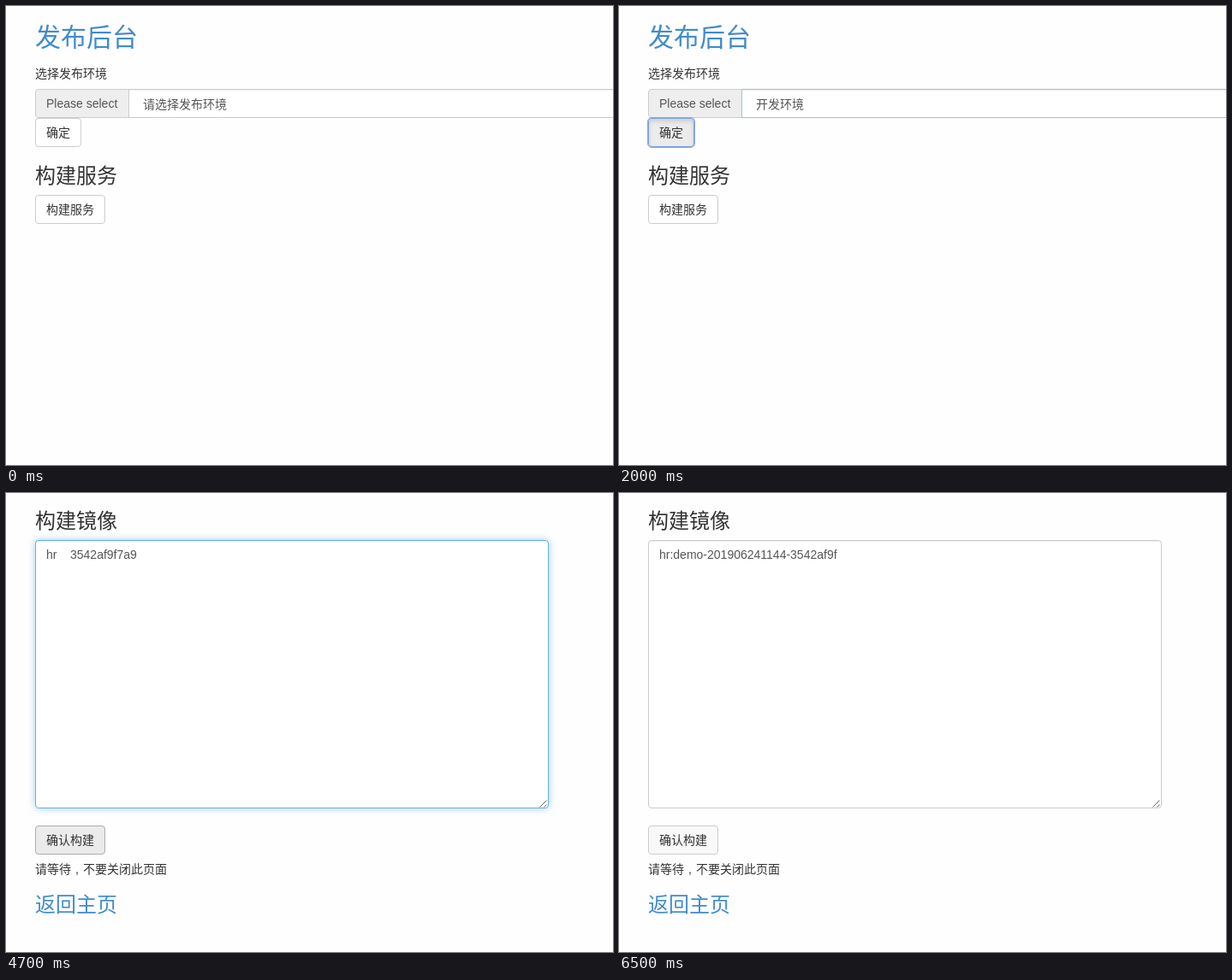
Recreate the animation shown at these times as an HTML page. Size 709 by 537 pixels, loop 8000 ms.

```html
<!DOCTYPE html>
<html lang="zh-CN">
<head>
<meta charset="utf-8">
<style>
html, body { margin: 0; width: 100%; height: 100%; overflow: hidden; background: #fefefe; }
#stage { position: absolute; left: 0; top: 0; width: 709px; height: 537px; overflow: hidden;
  font-family: "Liberation Sans", "Noto Sans CJK SC", "Noto Sans CJK", sans-serif; color: #333; }
#stage div { position: absolute; box-sizing: border-box; }
#stage .text { line-height: 20px; white-space: pre; }
.page { left: 0; top: 0; width: 100%; height: 100%; }
.box { border: 1px solid #ccc; border-radius: 4px; background: #fff; }
.press { background: #ebebeb; box-shadow: inset 0 3px 5px rgba(0,0,0,.125); }
.hover { background: #ebebeb; border-color: #adadad; }
.focus { outline: 1px solid #86a8ea; border-color: #7d9fe2; }
svg { position: absolute; left: 0; top: 0; }
</style>
</head>
<body>
<div id="stage"></div>
<script>
const LOOP = 8000;
const LINK = '#428bca';
const stage = document.getElementById('stage');

function add(parent, cls, style) {
  const el = document.createElement('div');
  el.className = cls;
  Object.assign(el.style, style);
  parent.appendChild(el);
  return el;
}

function box(parent, x, y, w, h, style, cls = 'box') {
  return add(parent, cls, { left: x + 'px', top: y + 'px', width: w + 'px', height: h + 'px', ...style });
}

// y is the text baseline
function text(parent, x, y, str, size = 14, color = '') {
  const top = y - Math.round(10 + size * 0.3465);
  const el = add(parent, 'text', { left: x + 'px', top: top + 'px', fontSize: size + 'px', color });
  el.textContent = str;
  return el;
}

function button(parent, y, w, label) {
  const el = box(parent, 34, y, w, 34);
  text(parent, 47, y + 22, label);
  return el;
}

const show = (el, on) => { el.style.visibility = on ? 'inherit' : 'hidden'; };
const mix = (a, b, k) => Math.round(a + (b - a) * k);

function glow(el, k) {
  el.style.borderColor = `rgb(${mix(204, 102, k)},${mix(204, 175, k)},${mix(204, 233, k)})`;
  el.style.boxShadow = `inset 0 1px 1px rgba(0,0,0,.075), 0 0 ${8 * k}px rgba(102,175,233,${0.6 * k})`;
}

// Home page
const home = add(stage, 'page');
text(home, 34, 47, '发布后台', 30, LINK);
text(home, 34, 84, '选择发布环境');
box(home, 34, 97, 110, 34, { background: '#eee', borderRadius: '4px 0 0 4px' });
text(home, 47, 119, 'Please select', 14, '#555');
const select = box(home, 143, 97, 640, 34, { borderRadius: 0 });
const chosen = text(home, 160, 120, '', 14, '#555');
const okButton = button(home, 131, 54, '确定');
text(home, 34, 207, '构建服务', 24);
const buildButton = button(home, 221, 82, '构建服务');

const menu = box(home, 143, 131, 640, 62, { borderColor: '#66afe9 #7b9cd8 #7b9cd8', borderRadius: 0 });
const mark = box(menu, 0, 0, 638, 20, { background: '#1e90ff' }, '');
const names = ['请选择发布环境', '开发环境', 'uat环境'];
const options = names.map((name, i) => text(menu, 16, 15 + 20 * i, name));

// Build page
const build = add(stage, 'page');
text(build, 34, 41, '构建镜像', 24);
const area = box(build, 34, 55, 600, 314);
const hint = text(build, 47, 77, 'service_name   git_commit_id\nweb' + ' '.repeat(18) + '1a2b3c4d5', 14, '#999');
const entry = text(build, 47, 77, '', 14, '#555');
const caret = box(build, 47, 65, 1, 15, { background: '#333' }, '');
build.insertAdjacentHTML('beforeend',
  '<svg width="709" height="537"><path d="M623.5 367.5l8-8M628.5 367.5l3-3" stroke="#666" fill="none"/></svg>');
const confirmButton = button(build, 389, 82, '确认构建');
text(build, 34, 445, '请等待');
text(build, 81, 445, ',');
text(build, 90, 445, '不要关闭此页面');
text(build, 34, 490, '返回主页', 24, LINK);

// Alert
const alertBox = box(stage, 309, -20, 460, 114, {
  borderColor: '#aaa', borderRadius: '3px', boxShadow: '0 1px 4px rgba(0,0,0,.4)'
});
text(alertBox, 15, 43, '镜像同步中，请等待一段时间', 13, '#5f5f5f');
box(alertBox, 368, 64, 70, 33, { background: '#669df9', borderColor: '#5a90f0', borderRadius: '3px' });
text(alertBox, 388, 85, '确定', 12, '#fff').style.fontWeight = 'bold';

// Value of the last [time, value] step that has been reached
function at(t, steps) {
  let value = steps[0][1];
  for (const [time, v] of steps) if (t >= time) value = v;
  return value;
}

function render(t) {
  const onBuild = t >= 2900;
  show(home, !onBuild);
  show(build, onBuild);

  glow(select, at(t, [[0, 0], [800, .5], [900, 1], [1900, .6], [2000, .3], [2100, 0]]));
  chosen.textContent = names[t < 1400 ? 0 : 1];
  show(menu, !onBuild && t >= 800 && t < 1400);
  const active = t < 1100 ? 0 : 1;
  mark.style.top = 20 * active + 'px';
  options.forEach((el, i) => { el.style.color = i === active ? '#fff' : '#555'; });
  okButton.className = at(t, [[0, 'box'], [1800, 'box hover'], [1900, 'box press focus'],
    [2200, 'box focus'], [2700, 'box']]);
  buildButton.className = at(t, [[0, 'box'], [2500, 'box hover'], [2700, 'box press focus'],
    [2800, 'box hover focus']]);

  glow(area, at(t, [[0, 0], [3300, .5], [3400, 1], [4900, .7], [5000, .4], [5100, .3], [6400, 0]]));
  show(hint, t < 4000);
  entry.textContent = at(t, [[0, ''], [4000, 'hr    3542af9f7a9'], [6400, 'hr:demo-201906241144-3542af9f']]);
  show(caret, onBuild && (t >= 3300 && t < 3700 || t >= 4000 && t < 4500));
  caret.style.left = (t < 4000 ? 47 : 153) + 'px';
  confirmButton.className = at(t, [[0, 'box'], [4700, 'box hover'], [4900, 'box press focus'], [6400, 'box']]);
  confirmButton.style.backgroundColor = t >= 6400 ? '#f8f8f8' : '';

  const open = at(t, [[0, 0], [5000, .4], [5100, 1], [6200, .4], [6300, 0]]);
  alertBox.style.opacity = open;
  alertBox.style.transform = open < 1 ? 'translateY(-10px)' : 'none';
}

const start = performance.now();
function tick(now) {
  const t = Math.max(0, now - start) % LOOP;
  render(Math.floor(t / 100) * 100);
  requestAnimationFrame(tick);
}
render(0);
requestAnimationFrame(tick);
</script>
</body>
</html>
```
